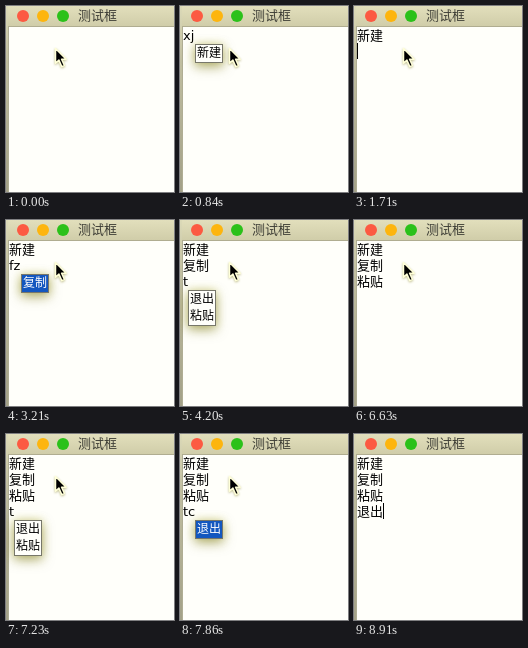
An HTML page for the animation above (9300 ms loop, 168 by 186 pixels).

```html
<!DOCTYPE html>
<html lang="zh-CN">
<head>
<meta charset="utf-8">
<title>测试框</title>
<style>
html, body { margin: 0; width: 100%; height: 100%; overflow: hidden; }
#stage {
  position: relative; width: 168px; height: 186px; overflow: hidden;
  background: #fffffa; color: #000;
  font: 13px/16px "DejaVu Sans", "Noto Sans CJK SC", "Noto Sans CJK", sans-serif;
  white-space: pre; cursor: none;
}
#stage div, #stage svg { position: absolute; }
#edge { left: 0; top: 0; width: 2px; height: 186px; background: linear-gradient(#dcdab8, #c0bea0 30%, #a3a188); border-right: 1px solid #b0ae94; }
#bar { left: 2px; top: 0; width: 166px; height: 20px; background: linear-gradient(#e2dfbc, #d0cda9); border-bottom: 1px solid #b0ad90; }
#title { left: 72px; top: 2px; color: #3e3e36; }
.dot { top: 4px; width: 12px; height: 12px; border-radius: 50%; }
#text { left: 3px; top: 22px; }
#text div { position: static; height: 16px; }
#caret { position: absolute; width: 1px; height: 16px; margin-top: -1px; background: #000; }
#menu {
  background: #fffffa; border: 1px solid #77776a; width: 26px; font-size: 12px; text-align: center;
  box-shadow: 0 4px 12px rgba(110, 105, 10, .5), 0 0 9px rgba(190, 185, 40, .35);
}
#menu div { position: static; height: 17px; line-height: 17px; }
#menu .on { background: #1357bf; color: #fff; }
#arrow { left: 0; top: 0; }
</style>
</head>
<body>
<div id="stage">
  <div id="edge"></div>
  <div id="bar"></div>
  <div class="dot" style="left:11px;background:#fc5a42"></div>
  <div class="dot" style="left:31px;background:#fdb50e"></div>
  <div class="dot" style="left:51px;background:#2bc11a"></div>
  <div id="title">测试框</div>
  <div id="text"></div>
  <div id="menu"></div>
  <svg id="arrow" width="168" height="186">
    <path d="M49.5 42.5V57.2L52.9 54.1L55.8 60.6L58.4 59.4L55.6 53.2H60.2Z"
      fill="#000" stroke="#ffffd8" stroke-width="1.5" stroke-linejoin="round"
      style="filter:drop-shadow(0 1px 1px rgba(120,115,20,.45))"/>
  </svg>
</div>
<script>
const LOOP = 9300;
const POINTER_GONE = 8820;
const both = ['退出', '粘贴'];

// [start ms, lines, caret shown, menu items, selected item]
const steps = [
  [0, ''],
  [480, 'x', true],
  [780, 'xj', true],
  [810, 'xj', false, ['新建'], -1],
  [1230, 'xj', false, ['新建'], 0],
  [1260, '新建', true],
  [1710, '新建\n', true],
  [2160, '新建\n'],
  [2370, '新建\nf', true],
  [2700, '新建\nfz', true],
  [2730, '新建\nfz', false, ['复制'], -1],
  [3210, '新建\nfz', false, ['复制'], 0],
  [3240, '新建\n复制', true],
  [3570, '新建\n复制\n', true],
  [4080, '新建\n复制\nt', true],
  [4140, '新建\n复制\nt', false, both, -1],
  [4470, '新建\n复制\nt', false, both, 0],
  [4980, '新建\n复制\nt', false, both, 1],
  [5370, '新建\n复制\n粘贴', true],
  [5970, '新建\n复制\n粘贴'],
  [6180, '新建\n复制\n粘贴\n', true],
  [6630, '新建\n复制\n粘贴\n'],
  [7080, '新建\n复制\n粘贴\nt', true],
  [7140, '新建\n复制\n粘贴\nt', false, both, -1],
  [7320, '新建\n复制\n粘贴\ntc', false, ['退出'], -1],
  [7860, '新建\n复制\n粘贴\ntc', false, ['退出'], 0],
  [7920, '新建\n复制\n粘贴\n退出', true],
  [8370, '新建\n复制\n粘贴\n退出'],
  [8820, '新建\n复制\n粘贴\n退出', true]
];

const text = document.getElementById('text');
const menu = document.getElementById('menu');
const arrow = document.getElementById('arrow');
const row = (html, cls = '') => `<div class="${cls}">${html}</div>`;

function show([time, value, caret, items, selected]) {
  const lines = value.split('\n');
  const last = lines.length - 1;
  text.innerHTML = lines
    .map((line, i) => row(line + (caret && i === last ? '<span id="caret"></span>' : '')))
    .join('');
  arrow.style.display = time < POINTER_GONE ? 'block' : 'none';
  menu.style.display = items ? 'block' : 'none';
  if (!items) return;
  menu.style.left = (lines[last].length > 1 ? 15 : 8) + 'px';
  menu.style.top = 38 + 16 * last + 'px';
  menu.innerHTML = items.map((item, i) => row(item, i === selected ? 'on' : '')).join('');
}

const start = performance.now();
let current;
function tick() {
  const time = (performance.now() - start) % LOOP;
  const step = steps.findLast(s => s[0] <= time) || steps[0];
  if (step !== current) show(current = step);
  requestAnimationFrame(tick);
}
tick();
</script>
</body>
</html>
```
